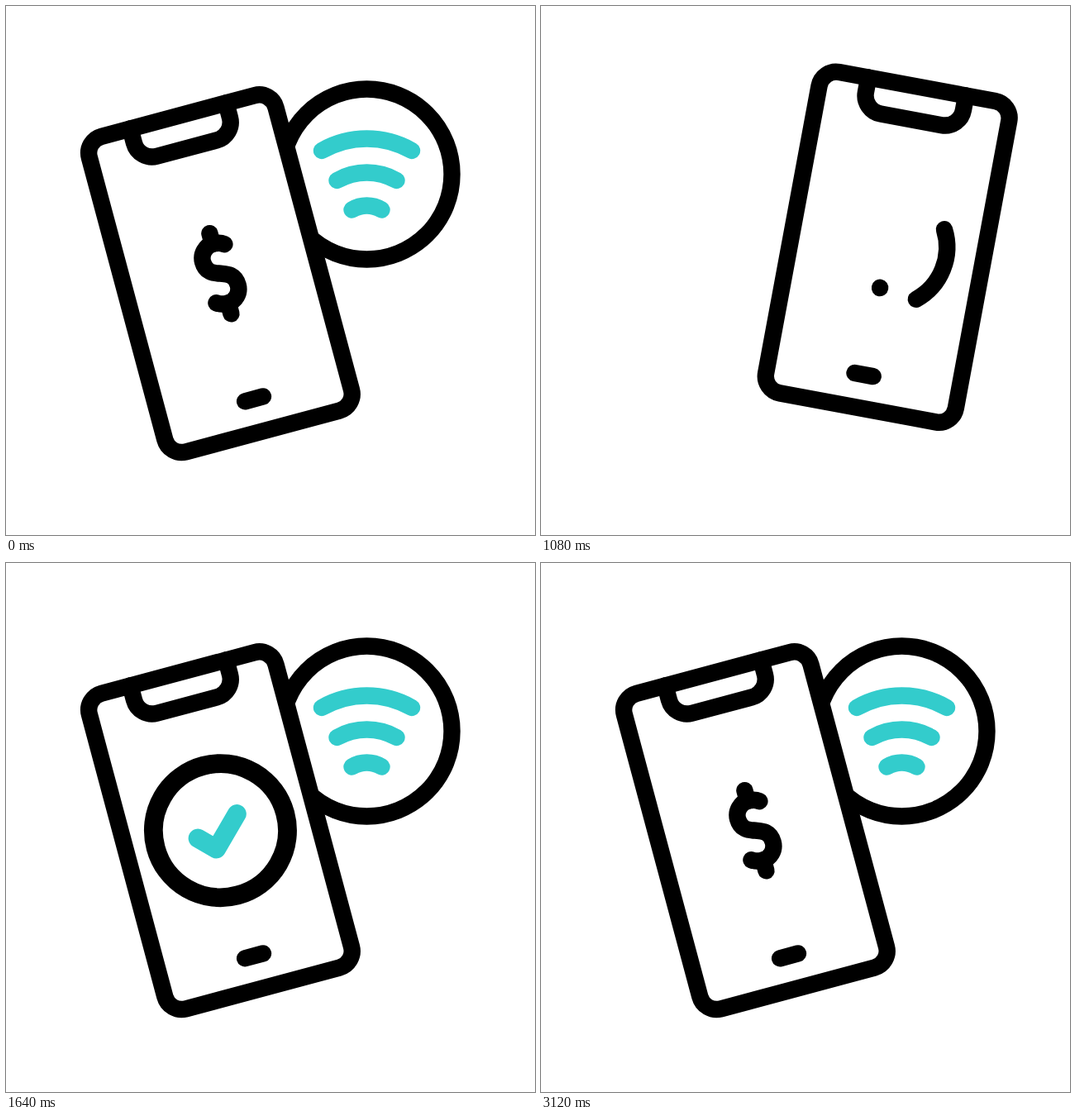
Animation, 640 px wide and 640 px high, one loop 3.4 s. Source, as an HTML page:

```html
<!DOCTYPE html>
<html lang="en">
<head>
<meta charset="utf-8">
<title>Mobile payment</title>
<style>
  html, body { margin: 0; width: 100%; height: 100%; overflow: hidden; background: #fff; }
  svg { display: block; width: 100vw; height: 100vh; }
  svg * { stroke-width: 20.4px; stroke-linecap: round; stroke-linejoin: round; }
  .ink { fill: none; stroke: #000; }
  .teal { fill: none; stroke: #33cccc; }
</style>
</head>
<body>
<svg viewBox="0 0 640 640">
  <circle class="ink" cx="436.5" cy="203.5" r="103"/>
  <path class="teal" d="M382 175A109.7 109.7 0 0 1 491 175M400.5 211A73 73 0 0 1 472.5 211M418.5 246.5A35 35 0 0 1 454.5 246.5"/>
  <g id="phone">
    <rect class="ink" style="fill:#fff" x="-116.8" y="-197.5" width="233.6" height="395" rx="20.8"/>
    <path class="ink" d="M-60-197.5v18a22.5 22.5 0 0 0 22.5 22.5h75a22.5 22.5 0 0 0 22.5-22.5v-18M-11.3 157h22.6"/>
    <g id="dollar" class="ink">
      <path d="M0-50.3V-37"/>
      <path d="M14-33C10-36 5.5-37 1-37C-9-37-17-29-17-19C-17-4-5-2 0 0C5 2 17 4 17 19C17 29 9 37-1 37C-5.5 37-10 36-14 33"/>
      <path d="M0 37V50.3"/>
    </g>
    <g id="badge">
      <path id="ring" class="ink" d="M72 0A72 72 0 0 0-72 0A72 72 0 0 0 72 0"/>
      <path id="check" class="teal" d="M-25.6 1.7L-9.3 18L21.7-12.7"/>
    </g>
  </g>
</svg>
<script>
  const LOOP = 3400;
  const get = id => document.getElementById(id);
  const [phone, badge, ring, check] = ['phone', 'badge', 'ring', 'check'].map(get);
  const clamp = x => Math.min(1, Math.max(0, x));
  const mix = (a, b, k) => a + (b - a) * k;

  // Smooth 0..1 progress between two times.
  const ease = (t, from, to) => {
    const x = clamp((t - from) / (to - from));
    return x * x * (3 - 2 * x);
  };
  // Rises during the first span, falls during the second.
  const pulse = (t, a, b, c, d) => ease(t, a, b) - ease(t, c, d);

  // Shows only the part of a path between the fractions a and b.
  function trim(path, a, b) {
    const len = path.getTotalLength();
    path.style.visibility = b - a > 1e-4 ? 'visible' : 'hidden';
    path.style.strokeDasharray = `${(b - a) * len + (b === 1 ? 1 : 0)} ${len * 2}`;
    path.style.strokeDashoffset = -a * len;
  }

  const strokes = [...get('dollar').children];
  const total = strokes.reduce((sum, p) => sum + p.getTotalLength(), 0);

  // The sign is wiped stroke by stroke, from the top to the bottom end.
  function wipeDollar(k) {
    let left = k * total;
    for (const p of strokes) {
      const len = p.getTotalLength();
      trim(p, clamp(left / len), 1);
      left -= len;
    }
  }

  function badgeScale(t) {
    if (t < 1500) return mix(1, 0.9, ease(t, 1300, 1500));
    if (t < 1700) return mix(0.9, 1.185, ease(t, 1500, 1700));
    return mix(1.185, 1, ease(t, 1700, 1915));
  }

  function draw(t) {
    const move = pulse(t, 0, 548, 1135, 1645);
    const x = mix(259.4, 419.2, move), y = mix(323.7, 291.7, move);
    phone.setAttribute('transform', `translate(${x} ${y}) rotate(${mix(-15, 10.5, move)})`);

    wipeDollar(pulse(t, 500, 1100, 2515, 3115));

    const turn = pulse(t, 900, 1500, 2200, 2800);
    trim(ring, 0, turn);
    ring.setAttribute('transform', `rotate(${90 - 180 * turn})`);
    trim(check, 0, pulse(t, 1100, 1500, 2200, 2600));
    badge.setAttribute('transform', `scale(${badgeScale(t)})`);
  }

  const start = performance.now();
  function tick() {
    draw((performance.now() - start) % LOOP);
    requestAnimationFrame(tick);
  }
  tick();
</script>
</body>
</html>
```
